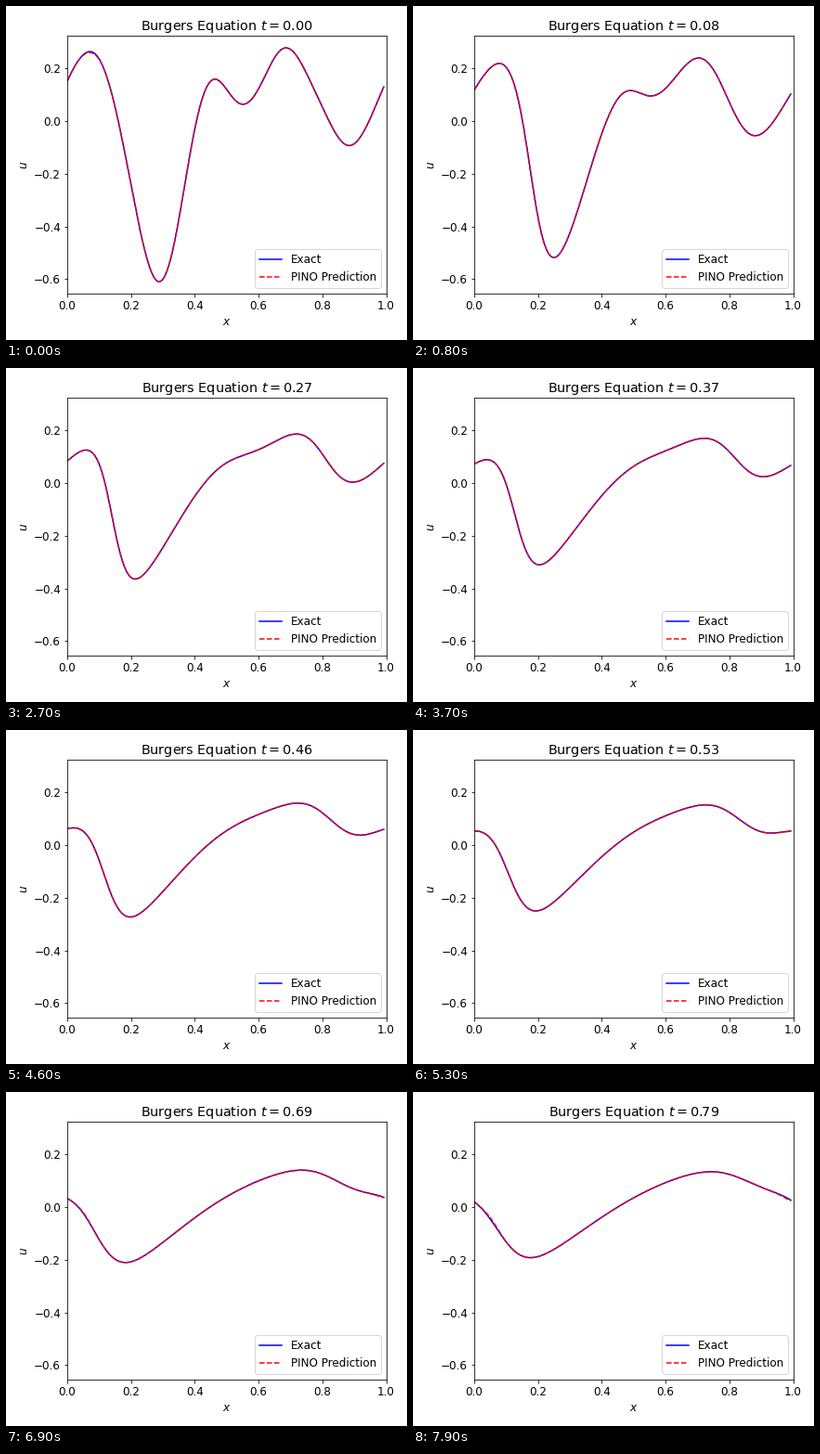
Animation of 432x360 px, one loop 8 s. Source, as a matplotlib script:

```python
import numpy as np
import matplotlib.pyplot as plt
from matplotlib.animation import FuncAnimation

W, H, DPI = 432, 360, 72
FRAMES, INTERVAL = 80, 100
N, NU, DT, SUBSTEPS = 128, 0.01, 0.001, 10

plt.rcParams.update({"font.family": "DejaVu Sans", "font.size": 12})

x = np.arange(N) / N
wave = 2j * np.pi * np.fft.rfftfreq(N, 1 / N)

# Initial profile: turning points and a few crossings (x, u)
TURNS = [(0.071, 0.265), (0.288, -0.611), (0.463, 0.160),
         (0.551, 0.064), (0.686, 0.279), (0.884, -0.093)]
PASSES = [(0, 0.152), (0.160, 0), (0.405, 0), (0.821, 0),
          (0.946, 0), (0.992, 0.130)]


def basis(pos, modes=14, slope=False):
    """Periodic basis, weighted so that smooth curves are preferred."""
    k = np.arange(modes + 1)
    amp = 0.2 / (1 + (k / 4) ** 4)
    w = 2 * np.pi * k
    arg = np.outer(pos, w)
    c, s = np.cos(arg), np.sin(arg)
    if slope:
        c, s = -w * s, w * c
    return np.hstack([c * amp, s * amp])


def initial_profile():
    px, pu = np.array(TURNS + PASSES).T
    tx = px[:len(TURNS)]
    mean = basis(x).mean(axis=0, keepdims=True)
    rows = np.vstack([basis(px), basis(tx, slope=True) / 40, mean])
    goal = np.concatenate([pu, np.zeros(len(TURNS) + 1)])
    gram = rows @ rows.T + 0.002 ** 2 * np.eye(len(goal))
    return basis(x) @ rows.T @ np.linalg.solve(gram, goal)


def rate(u):
    """Burgers: u_t = -(u^2 / 2)_x + nu u_xx"""
    spec = -wave * np.fft.rfft(u * u / 2) + NU * wave ** 2 * np.fft.rfft(u)
    return np.fft.irfft(spec, N)


def step(u):
    a = rate(u)
    b = rate(u + DT / 2 * a)
    c = rate(u + DT / 2 * b)
    d = rate(u + DT * c)
    return u + DT / 6 * (a + 2 * b + 2 * c + d)


def solve():
    u = initial_profile()
    out = [u]
    for _ in range(FRAMES - 1):
        for _ in range(SUBSTEPS):
            u = step(u)
        out.append(u)
    return out


def bump(center, width):
    return np.exp(-((x - center) / width) ** 2)


def predict(u, t):
    """Model output: small misfit at the start and at late times."""
    early = -0.004 * np.exp(-t / 0.03) * bump(0.075, 0.03)
    late = (t / 0.8) ** 5 * (0.006 * bump(0.055, 0.03) - 0.004 * bump(0.98, 0.03))
    return u + early + late


exact = solve()

fig = plt.figure(figsize=(W / DPI, H / DPI), dpi=DPI, facecolor="white")
left, right, top, bottom = 66, 409.6, 32.3, 309.8
ax = fig.add_axes([left / W, 1 - bottom / H, (right - left) / W, (bottom - top) / H])
ax.set(xlim=(0, 1), ylim=(-0.655, 0.324), xlabel="$x$", ylabel="$u$")
ax.set_xticks(np.arange(6) / 5)
ax.set_yticks(np.arange(-3, 2) / 5)

exact_line, = ax.plot(x, exact[0], "b-", lw=1.5, label="Exact")
pred_line, = ax.plot(x, exact[0], "r--", lw=1.5, label="PINO Prediction")
title = ax.set_title("")
ax.legend(loc="lower right")


def update(i):
    t = i / 100
    exact_line.set_ydata(exact[i])
    pred_line.set_ydata(predict(exact[i], t))
    title.set_text(f"Burgers Equation $t={t:.2f}$")
    return exact_line, pred_line, title


anim = FuncAnimation(fig, update, frames=FRAMES, interval=INTERVAL,
                     repeat=True, repeat_delay=0, blit=False)
plt.show()
```
